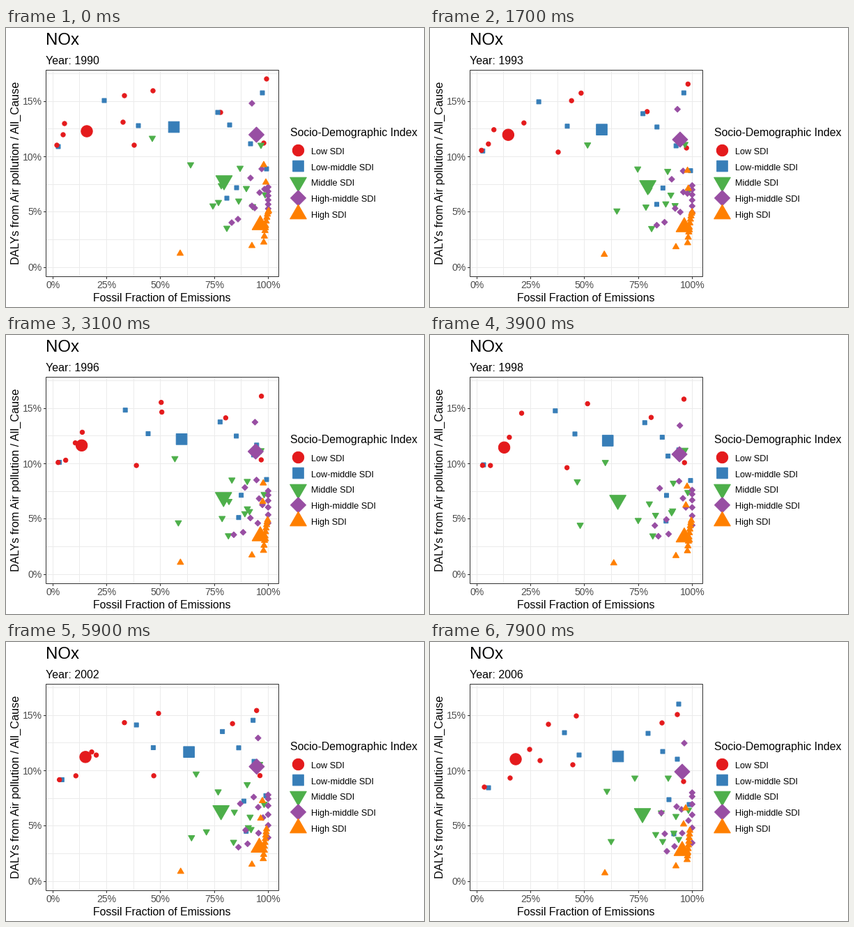
Recreate the animation shown at these times as a matplotlib script. Size 600x400 px, loop 8 s.

```python
import math
import numpy as np
import matplotlib.pyplot as plt
from matplotlib.animation import FuncAnimation
from matplotlib.collections import PolyCollection
from matplotlib.patches import Rectangle

W, H, DPI = 600, 400, 100
PX = 72 / DPI
INTERVAL, FRAMES = 100, 80
LAST_STEP, YEARS_PER_STEP = 38, 3 / 7
BIG, SMALL = 8.8, 3.4

plt.rcParams["font.family"] = ["Liberation Sans", "DejaVu Sans"]


def ring(n, start, radius):
    """Regular polygon centred on its bounding box."""
    a = np.radians(start) + np.arange(n) * 2 * np.pi / n
    v = radius * np.column_stack([np.cos(a), np.sin(a)])
    return v - (v.max(axis=0) + v.min(axis=0)) / 2


# Polygons share the area of a unit circle; angles run clockwise on screen.
TRI = math.sqrt(4 * math.pi / (3 * math.sqrt(3)))
QUAD = math.sqrt(math.pi / 2)
LOW = (ring(48, 0, 0.93), "#E41A1C")
LOWMID = (ring(4, 45, QUAD), "#377EB8")
MID = (ring(3, 90, TRI), "#4DAF4A")
HIGHMID = (ring(4, 0, QUAD), "#984EA3")
HIGH = (ring(3, -90, TRI), "#FF7F00")


class Marker:
    """Travels through evenly timed way points; dips left in 1998."""

    def __init__(self, group, way, dip, size):
        self.shape, self.color = group
        self.way, self.dip, self.size = np.array(way, float), dip, size

    def verts(self, step):
        keys = np.linspace(0, LAST_STEP, len(self.way))
        x, y = (np.interp(step, keys, v) for v in self.way.T)
        dip = self.dip * max(0, 1 - abs(step * YEARS_PER_STEP - 8) / 1.7)
        return self.shape * self.size + (x - dip, y)


markers = []


def move(group, *way, dip=0, size=SMALL):
    markers.append(Marker(group, way, dip, size))


move(LOWMID, (75, 170), (77, 187), (84, 209))

move(LOW, (73, 168), (78, 208))
move(LOW, (82, 153), (87, 189), (115, 195))
move(LOW, (84, 137), (105, 161), (143, 154))
move(LOW, (168, 135), (108, 137), (122, 160), (158, 170))
move(LOW, (170, 97), (230, 110), (170, 115), (170, 118), dip=88)
move(LOW, (184, 168), (184, 186), (214, 196), (205, 176))
move(LOW, (211, 90), (227, 99), (210, 106))
move(LOW, (308, 121), (318, 118), (333, 116))
move(LOW, (374, 73), (364, 93), (355, 104))
move(LOW, (370, 165), (365, 184), (364, 200))
move(LOW, (116, 148), (106, 162), (123, 168), size=BIG)

move(LOWMID, (141, 104), (182, 109), (193, 130))
move(LOWMID, (190, 140), (209, 142), (214, 162))
move(LOWMID, (304, 121), (313, 131))
move(LOWMID, (321, 139), (334, 147), (334, 157))
move(LOWMID, (317, 244), (340, 268), (350, 275))
move(LOWMID, (331, 229), (340, 230), (343, 226))
move(LOWMID, (351, 166), (357, 174), (355, 168), dip=18)
move(LOWMID, (368, 93), (364, 93), (359, 170), (354, 156), (355, 92), (357, 89))
move(LOWMID, (374, 202), (374, 209), (372, 233))
move(LOWMID, (241, 142), (256, 152), (270, 164), size=BIG)

move(MID, (210, 159), (254, 185), (294, 196))
move(MID, (265, 197), (325, 208), (318, 216), (254, 215), dip=133)
move(MID, (336, 202), (350, 214), (342, 196))
move(MID, (297, 256), (245, 269), (268, 280), (260, 287), dip=47)
move(MID, (305, 251), (314, 263), (278, 272), (324, 277))
move(MID, (317, 288), (320, 289), (334, 287))
move(MID, (309, 227), (324, 244), (332, 246), dip=10)
move(MID, (334, 249), (346, 260), (350, 275), dip=26)
move(MID, (345, 231), (347, 257), (357, 284))
move(MID, (354, 257), (348, 253), (353, 251))
move(MID, (366, 169), (366, 166), (362, 188))
move(MID, (372, 240), (370, 226), (371, 242))
move(MID, (313, 222), (312, 241), (305, 249), dip=51, size=BIG)

move(HIGHMID, (353, 108), (359, 131), (365, 145))
move(HIGHMID, (367, 202), (357, 210), (354, 236))
move(HIGHMID, (351, 215), (340, 220), (332, 245), dip=13)
move(HIGHMID, (364, 236), (363, 234), (361, 240))
move(HIGHMID, (371, 231), (367, 248), (371, 256))
move(HIGHMID, (353, 255), (350, 265), (337, 275), dip=13)
move(HIGHMID, (357, 258), (363, 274), (362, 274), dip=48)
move(HIGHMID, (324, 279), (328, 289), (340, 300))
move(HIGHMID, (333, 274), (343, 286), (351, 293))
for t in np.linspace(0, 1, 6):  # column at the 100% line
    move(HIGHMID, (376.3, 228 + 31 * t), (376.3, 216 + 72 * t ** 1.6))
move(HIGHMID, (359.5, 153), (358, 172), (362, 186), size=BIG)

move(HIGH, (370, 195), (369, 217), (367, 237))
move(HIGH, (373, 220), (367, 244), (364, 260))
move(HIGH, (250, 322), (251, 330), dip=-16)
move(HIGH, (353, 311), (353, 320))
for t in np.linspace(0, 1, 9):  # dense stack left of the 100% line
    move(HIGH, (377 - 7 * t, 261 + 45 * t ** 1.6), (373 - 4 * t, 269 + 42 * t))
move(HIGH, (365, 279), (365, 287), (362, 296), size=BIG)


fig = plt.figure(figsize=(W / DPI, H / DPI), dpi=DPI, facecolor="white")
ax = fig.add_axes([0, 0, 1, 1])
ax.set_xlim(0, W)
ax.set_ylim(H, 0)
ax.axis("off")


def line(xs, ys, color):
    ax.plot(xs, ys, color=color, lw=PX, solid_capstyle="butt", snap=False, zorder=1)


def text(x, y, s, px, color="black", **kw):
    return ax.text(x, y, s, fontsize=px * PX, color=color, va="baseline", **kw)


L, R, T, B = 57.5, 391.5, 60.5, 356.5
GRID, DARK, GREY = "#EBEBEB", "#333333", "#4D4D4D"


def x_of(pct):
    return math.floor(67.2 + 3.092 * pct) + 0.5


def y_of(pct):
    return math.floor(343.3 - 15.87 * pct) + 0.5


for i in range(9):
    x = x_of(12.5 * i)
    line([x, x], [T, B], GRID)
    if i % 2 == 0:
        line([x, x], [B, B + 3.5], DARK)
        text(x, 373.3, f"{12.5 * i:.0f}%", 14, GREY, ha="center")
for i in range(8):
    y = y_of(2.5 * i)
    line([L, R], [y, y], GRID)
    if i % 2 == 0:
        line([L - 3.5, L], [y, y], DARK)
        text(52, y + 5, f"{2.5 * i:.0f}%", 14, GREY, ha="right")
ax.add_patch(Rectangle((L, T), R - L, B - T, fill=False, ec=DARK, lw=PX,
                       snap=False, zorder=4))

text(57.2, 24.5, "NOx", 24)
year_label = text(57, 52, "", 16)
text(223.5, 392, "Fossil Fraction of Emissions", 15.9, ha="center")
text(19, 208, "DALYs from Air pollution / All_Cause", 16.2, ha="center",
     rotation=90, rotation_mode="anchor")

text(407.5, 155, "Socio-Demographic Index", 15.85)
legend = [
    (LOW, "Low SDI", 175.5),
    (LOWMID, "Low-middle SDI", 198),
    (MID, "Middle SDI", 224.5),
    (HIGHMID, "High-middle SDI", 243.8),
    (HIGH, "High SDI", 263.5),
]
for i, ((shape, color), label, y) in enumerate(legend):
    ax.add_patch(plt.Polygon(shape * BIG + (419.5, y), fc=color, ec=color,
                             lw=PX, joinstyle="miter", snap=False))
    text(437.5, 180.7 + 22.8 * i, label, 12.8)

colors = [m.color for m in markers]
cloud = PolyCollection([], facecolors=colors, edgecolors=colors, linewidths=PX,
                       joinstyle="miter", snap=False, zorder=3)
ax.add_collection(cloud, autolim=False)


def draw(frame):
    ms = frame * INTERVAL
    step = 0 if ms < 500 else 1 + (ms - 500) // 200
    cloud.set_verts([m.verts(step) for m in markers])
    year_label.set_text(f"Year: {round(1990 + step * YEARS_PER_STEP)}")
    return cloud, year_label


anim = FuncAnimation(fig, draw, frames=FRAMES, interval=INTERVAL, repeat=True, repeat_delay=0)
plt.show()
```
